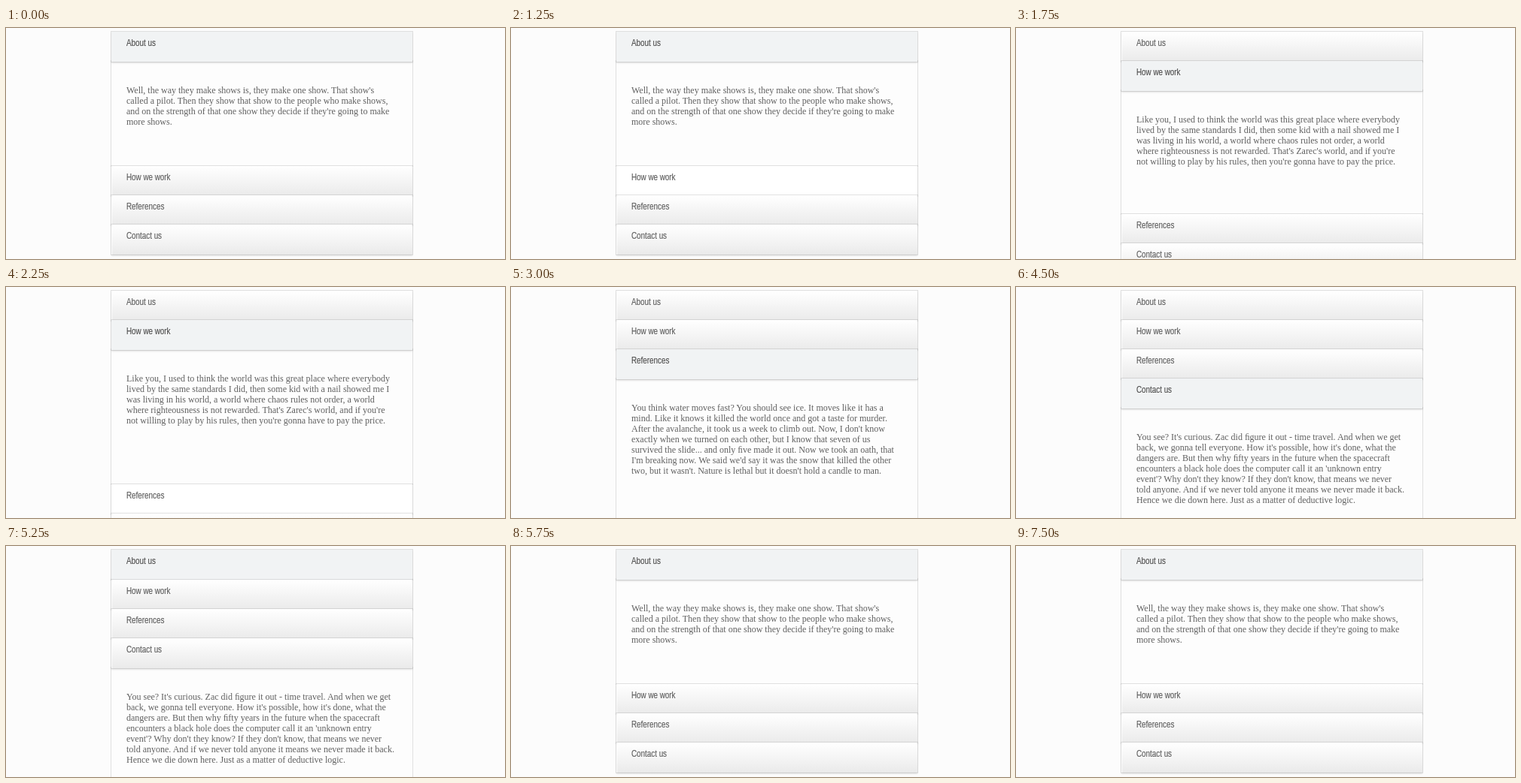
An HTML page for the animation above (8 s loop, 663 by 308 pixels).

```html
<!DOCTYPE html>
<html lang="en">
<head>
<meta charset="utf-8">
<title>Accordion</title>
<style>
html, body { margin: 0; width: 100%; height: 100%; overflow: hidden; background: #fcfcfc; }
#stage { position: relative; width: 100%; height: 100%; overflow: hidden; contain: strict; }
#accordion { position: absolute; left: 140px; top: 5px; width: 400px; color: #606060; }
h2 {
  position: relative; z-index: 2; box-sizing: border-box; height: 40px; margin: 0; padding-left: 20px;
  font: 12px/30px "Liberation Sans", Arial, sans-serif;
  -webkit-text-stroke: .2px;
  text-shadow: 1px 1px 1px rgba(255, 255, 255, .8);
  background: linear-gradient(#fff 1%, #eaeaea 100%);
  box-shadow: 0 0 0 1px rgba(155, 155, 155, .3), inset 1px 0 rgba(255, 255, 255, .9), 0 2px 2px rgba(0, 0, 0, .1);
}
/* condensed face shared by all headings */
h2 span { display: inline-block; transform: scaleX(.82); transform-origin: 0 0; }
h2.hover { background: #fff; }
h2.open {
  color: #505050; background: #f1f3f4;
  box-shadow: 0 0 0 1px rgba(155, 155, 155, .3), 0 2px 2px rgba(0, 0, 0, .1);
}
article { position: relative; margin-top: -1px; height: 0; overflow: hidden; background: rgba(255, 255, 255, .5); }
p {
  margin: 32px 0 0 20px; white-space: pre;
  font: 12px/14px "Liberation Serif", Times, serif;
  text-rendering: optimizeLegibility;
}
</style>
</head>
<body>
<div id="stage"><div id="accordion"></div></div>
<script>
const LOOP = 8000, TICK = 250;

const sections = [
  { title: "About us", height: 140, open: 5220, close: 1350, lines: [
    "Well, the way they make shows is, they make one show. That show's",
    "called a pilot. Then they show that show to the people who make shows,",
    "and on the strength of that one show they decide if they're going to make",
    "more shows."] },
  { title: "How we work", height: 180, open: 1350, close: 2620, lines: [
    "Like you, I used to think the world was this great place where everybody",
    "lived by the same standards I did, then some kid with a nail showed me I",
    "was living in his world, a world where chaos rules not order, a world",
    "where righteousness is not rewarded. That's Zarec's world, and if you're",
    "not willing to play by his rules, then you're gonna have to pay the price."] },
  { title: "References", height: 230, open: 2620, close: 3985, lines: [
    "You think water moves fast? You should see ice. It moves like it has a",
    "mind. Like it knows it killed the world once and got a taste for murder.",
    "After the avalanche, it took us a week to climb out. Now, I don't know",
    "exactly when we turned on each other, but I know that seven of us",
    "survived the slide... and only five made it out. Now we took an oath, that",
    "I'm breaking now. We said we'd say it was the snow that killed the other",
    "two, but it wasn't. Nature is lethal but it doesn't hold a candle to man."] },
  { title: "Contact us", height: 230, open: 3985, close: 5220, lines: [
    "You see? It's curious. Zac did figure it out - time travel. And when we get",
    "back, we gonna tell everyone. How it's possible, how it's done, what the",
    "dangers are. But then why fifty years in the future when the spacecraft",
    "encounters a black hole does the computer call it an 'unknown entry",
    "event'? Why don't they know? If they don't know, that means we never",
    "told anyone. And if we never told anyone it means we never made it back.",
    "Hence we die down here. Just as a matter of deductive logic."] }
];

// section, from, to
const hovers = [[1, 1250, 1350], [2, 2250, 2620], [1, 4750, 5000], [0, 5000, 5220]];

function add(parent, tag, text = "") {
  const el = parent.appendChild(document.createElement(tag));
  el.textContent = text;
  return el;
}

// One paused loop that eases a property on at `open` and off at `close`.
function toggle(el, { open, close }, prop, on, off, openMs, closeMs, easing) {
  const key = (time, value, ease = "linear") => ({ offset: time / LOOP, [prop]: value, easing: ease });
  const rest = open > close ? on : off;
  const frames = [
    key(0, rest),
    key(open, off, easing), key(open + openMs, on),
    key(close, on, easing), key(close + closeMs, off),
    key(LOOP, rest)
  ].sort((a, b) => a.offset - b.offset);
  const animation = el.animate(frames, { duration: LOOP, iterations: Infinity });
  animation.pause();
  return animation;
}

const root = document.getElementById("accordion");
const ring = alpha => `0 0 0 1px rgba(155, 155, 155, ${alpha})`;
const ligate = text => text.replaceAll("fi", "\ufb01");
const animations = [];

for (const section of sections) {
  section.head = add(root, "h2");
  add(section.head, "span", section.title);
  const article = add(root, "article");
  add(article, "p", ligate(section.lines.join("\n")));
  animations.push(
    toggle(article, section, "height", section.height + "px", "0px", 500, 300, "ease-in-out"),
    toggle(article, section, "boxShadow", ring(.3), ring(0), 100, 600, "linear"));
}

function isOpen({ open, close }, t) {
  return open < close ? t >= open && t < close : t >= open || t < close;
}

function render(t) {
  for (const animation of animations) animation.currentTime = t;
  sections.forEach((section, i) => {
    const hovered = hovers.some(([index, from, to]) => index === i && t >= from && t < to);
    section.head.className = isOpen(section, t) ? "open" : hovered ? "hover" : "";
  });
}

const start = performance.now();
function frame() {
  const t = (performance.now() - start) % LOOP;
  render(Math.floor(t / TICK) * TICK);
  requestAnimationFrame(frame);
}
frame();
</script>
</body>
</html>
```
